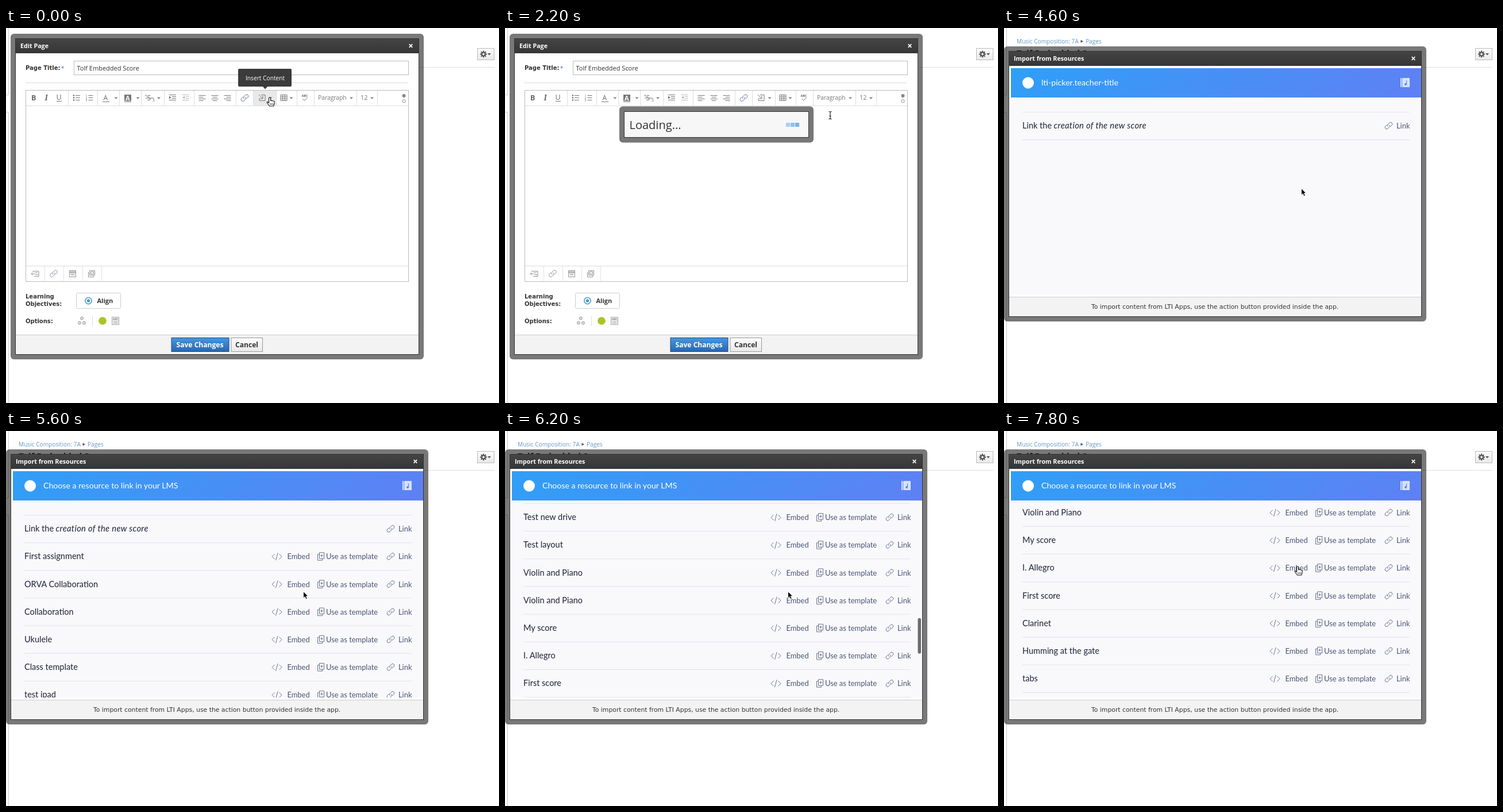
An HTML page for the animation above (8 s loop, 858x653 px).

```html
<!DOCTYPE html>
<html lang="en">
<head>
<meta charset="utf-8">
<title>Insert content</title>
<style>
html, body { margin: 0; width: 100%; height: 100%; overflow: hidden; background: #fff; }
svg { display: block; width: 100%; height: 100%; }
text { white-space: pre; font-family: "Open Sans", sans-serif; }
.lato { font-family: Lato, sans-serif; }
.wide { font-family: "DejaVu Sans", sans-serif; }
.serif { font-family: "Liberation Serif", serif; }
.b { font-weight: 700; }
.i { font-style: italic; }
.ln { fill: none; stroke: #777; stroke-width: 1; }
.dot { fill: none; stroke: #bbb; stroke-dasharray: 1 1; }
.act { fill: none; stroke: #59637f; stroke-width: .9; }
</style>
</head>
<body>
<svg id="stage" viewBox="0 0 858 653" xmlns="http://www.w3.org/2000/svg"></svg>
<script>
const LOOP = 8000, STEP = 200, PITCH = 48.2;

const text = (x, y, s, size, fill = '#333', cls = '', more = '') =>
  `<text x="${x}" y="${y}" font-size="${size}" fill="${fill}" class="${cls}" ${more}>${s}</text>`;
const rect = (x, y, w, h, fill, more = '') =>
  `<rect x="${x}" y="${y}" width="${w}" height="${h}" fill="${fill}" ${more}/>`;
const path = (d, cls = 'ln', more = '') => `<path d="${d}" class="${cls}" ${more}/>`;
const circle = (x, y, r, fill, more = '') => `<circle cx="${x}" cy="${y}" r="${r}" fill="${fill}" ${more}/>`;
const group = (id, body, more = '') => `<g id="${id}" ${more}>${body}</g>`;
const caret = (x, y = 120.5, fill = '#888') => `<path d="M${x - 3} ${y}h6l-3 3.4z" fill="${fill}"/>`;
const cross = (x, y) => path(`M${x - 2.8} ${y - 2.8}l5.6 5.6m0 -5.6l-5.6 5.6`, '', 'stroke="#fff" stroke-width="1.7"');

const defs = `<defs>
  <linearGradient id="bar" x2="0" y2="1"><stop stop-color="#444"/><stop offset="1" stop-color="#363636"/></linearGradient>
  <linearGradient id="blue" x2="0" y2="1"><stop stop-color="#4797e0"/><stop offset="1" stop-color="#2767b0"/></linearGradient>
  <linearGradient id="grey" x2="0" y2="1"><stop stop-color="#fcfcfc"/><stop offset="1" stop-color="#e9e9e9"/></linearGradient>
  <linearGradient id="banner" gradientUnits="userSpaceOnUse" x1="178" y1="-96" x2="560" y2="287">
    <stop stop-color="#2f9ff7"/><stop offset="1" stop-color="#5f80f4"/></linearGradient>
  <clipPath id="view"><rect x="12" y="121" width="714" height="343"/></clipPath>
  <g id="chain" class="act"><path d="M668.3 171.6a2.9 2.9 0 0 1 0 -3.9l2.6 -2.6a2.9 2.9 0 0 1 4.1 4.1l-2.6 2.6M670.6 168.7a2.9 2.9 0 0 1 0 3.9l-2.6 2.6a2.9 2.9 0 0 1 -4.1 -4.1l2.6 -2.6"/></g>
  <g id="linkAct"><use href="#chain"/>${text(683, 175.2, 'Link', 12.9, '#4b5573', 'lato')}</g>
  <g id="acts">
    ${path('M467.5 166l-4.5 4.5 4.5 4.5M475.5 166l4.5 4.5 -4.5 4.5M473 164l-3.5 13', 'act')}
    ${text(489.5, 175.2, 'Embed', 12.9, '#4b5573', 'lato')}
    ${path('M545.5 163.5h8v10.5h-8zM545.5 166.5h-3v10.500h8v-3M549.5 166.500v4.500M547.200 168.800h4.600', 'act')}
    ${text(557, 175.2, 'Use as template', 12.9, '#4b5573', 'lato')}
    <use href="#linkAct"/>
  </g>
</defs>`;

function page() {
  const teeth = [...Array(8).keys()].map(k =>
    `<rect x="829.9" y="39.6" width="2.2" height="3" fill="#555" transform="rotate(${k * 45} 831 45.5)"/>`).join('');
  return path('M4.5 0V116.5H0M0 146.5H4.5V653', '', 'fill="none" stroke="#ccc"')
    + path('M22 68.5H850', '', 'stroke="#ddd"')
    + text(22, 27, 'Music Composition: 7A', 10.15, '#6697c6')
    + '<path d="M133.5 20.7v5l4.5 -2.5z" fill="#555"/>'
    + text(142, 27, 'Pages', 10.15, '#6697c6')
    + text(22, 49, 'Tolf Embedded Score', 15, '#333', 'b')
    + rect(820.5, 35.5, 29, 20, 'url(#grey)', 'stroke="#bbb"')
    + teeth + circle(831, 45.5, 2.9, 'none', 'stroke="#555" stroke-width="2"')
    + caret(841, 44, '#555');
}

// Translucent frame with a dark title bar
function dialog(x, y, w, h, title, foot) {
  return rect(x - 8, y - 8, w + 17, h + 17, '#000', 'rx="6" fill-opacity=".53"')
    + rect(x + .5, y + .5, w, h, '#fff', 'stroke="#333"')
    + rect(x + 1, y + 1, w - 1, 25, 'url(#bar)')
    + text(x + 9, y + 17.4, title, 10.7, '#fff', 'b')
    + cross(x + w - 13.5, y + 13)
    + rect(x + 1, foot, w - 1, y + h - foot, '#f3f3f3')
    + path(`M${x + 1} ${foot + .5}h${w - 1}`, '', 'stroke="#ccc"');
}

// Stacked lines: [offset, length] pairs, 3 px apart
const lines = (x, y, pairs) =>
  path(pairs.map(([o, n], k) => `M${x + o} ${y + k * 3}h${n}`).join(''));

function toolbar() {
  const g = '#666', dividers = [108, 159, 197, 235, 275, 327, 400, 430, 470, 506, 536, 610, 646];
  let s = dividers.map(x => path(`M${x + .5} 109V135`, 'dot')).join('');
  s += text(44, 126, 'B', 12.5, g, 'b') + text(67.5, 126, 'I', 14, g, 'serif i b') + text(87.5, 125, 'U', 12.5, g)
    + path('M88 127.5h9');
  for (let k = 0; k < 3; k++) {
    const y = 117.5 + k * 4;
    s += circle(118, y, 1.2, g) + path(`M121 ${y}h8M143.5 ${y}h8`)
      + text(138.5, y + 2, k + 1, 5, g);
  }
  s += text(169.5, 126, 'A', 12, g) + path('M168 128.5h12', 'ln', 'stroke-width="2"') + caret(191.5)
    + rect(206, 116, 12, 11, '#777') + text(208, 125.5, 'A', 11, '#fff', 'b') + path('M206 128.5h12') + caret(229.5)
    + text(245.5, 126, 'S', 12, g) + path('M243 122h14') + text(242, 119, 'a', 6, g) + text(255, 128, '3', 6.5, g) + caret(266)
    + lines(284, 116.5, [[0, 12], [5, 7], [5, 7], [0, 12]]) + '<path d="M284 118.5v5l3.5 -2.5z" fill="#666"/>'
    + '<g opacity=".5">' + lines(306.5, 116.5, [[0, 12], [6, 6], [6, 6], [0, 12]]) + '<path d="M311 118.5v5l-4 -2.5z" fill="#666"/></g>'
    + lines(335.5, 117.5, [[0, 12], [0, 8], [0, 12], [0, 8]])
    + lines(357.5, 117.5, [[0, 12], [2, 8], [0, 12], [2, 8]])
    + lines(379.5, 117.5, [[0, 12], [4, 8], [0, 12], [4, 8]])
    + '<use href="#chain" x="-254" y="-48.5"/>'
    + path('M444 116.5h7v10h-10v-4M440 116l6.5 6.5M447 118v5h-5', 'ln', 'stroke-width="1.4"') + caret(460.5)
    + path('M478 116.5h11v10h-11zM478 119.8h11M478 123.2h11M481.7 116.5v10M485.4 116.5v10') + caret(496.5)
    + text(514.5, 119.5, 'ABC', 5.5, g, 'b') + path('M516.5 123l3 3.5 5 -5.5', 'ln', 'stroke-width="1.8"')
    + text(543, 125.3, 'Paragraph', 10.3, '#777') + caret(601)
    + text(617, 125.3, '12', 10.8, '#777') + caret(637)
    + circle(692.5, 118, 3, '#888') + circle(692.5, 127.3, 2.6, '#fff', 'stroke="#888"');
  return s;
}

function lowerIcons() {
  let s = [67, 100, 133, 166].map(x => path(`M${x + .5} 415V441`, 'dot')).join('');
  s += path('M46 423.5h11v9h-8M44 428h6M46.5 425.5l-2.5 2.5 2.5 2.5M50 426h5M51 429.5h5')
    + '<use href="#chain" x="-586.5" y="257.5"/>'
    + rect(110.5, 422.5, 11, 4, '#bbb', 'stroke="#888"') + rect(110.5, 426.5, 11, 7, '#eee', 'stroke="#888"') + path('M113 429.5h6')
    + path('M145.5 422.5h9v8h-9zM143.5 425v8.5h9v-2M147.5 424.5h5v4h-5z');
  return `<g opacity=".8">${s}</g>`;
}

function editPage() {
  return dialog(16, 18, 702, 550, 'Edit Page', 534)
    + text(34, 73, 'Page Title:', 10, '#333', 'wide b') + text(96, 74, '*', 10.5, '#3b6fc4', 'wide')
    + rect(118.5, 57.5, 582, 24, '#fff', 'stroke="#bbb"') + text(123.5, 73.5, 'Tolf Embedded Score', 11)
    + path('M34 95.5H700', 'dot')
    + rect(34.5, 108.5, 666, 333, '#fff', 'stroke="#bbb"')
    + rect(431, 109, 39, 26, '#e9e9e9', 'id="pressed"')
    + path('M35 135.5H700M35 414.5H700', 'dot')
    + toolbar() + lowerIcons()
    + text(34, 470.5, 'Learning', 10, '#333', 'wide b') + text(34, 483.5, 'Objectives:', 10, '#333', 'wide b')
    + rect(122.5, 461.5, 77, 27, '#fff', 'rx="2" stroke="#ccc"')
    + circle(143.5, 475, 5.6, '#fff', 'stroke="#5aa5d8" stroke-width="1.8"') + circle(143.5, 475, 2.7, '#4a97d0')
    + text(158.5, 479, 'Align', 11, '#333', 'b')
    + text(34, 513.5, 'Options:', 10, '#333', 'wide b')
    + [[132, 505.5], [128, 513.5], [136, 513.5]].map(([x, y]) => circle(x, y, 2.5, '#ddd', 'stroke="#999"')).join('')
    + path('M150.5 502V519', 'dot') + circle(168, 510, 6.8, '#a9c523')
    + rect(184.5, 503.5, 12, 13, '#f2f2f2', 'stroke="#aaa"') + text(185.7, 509.3, 'ABC', 5, '#888', 'b')
    + path('M186.5 511.5h8M186.5 514h8', 'ln', 'opacity=".6"')
    + rect(288, 539.5, 100, 24, 'url(#blue)', 'stroke="#1f4a7c"') + text(296.5, 556, 'Save Changes', 12.1, '#fff', 'b')
    + rect(392, 539.5, 54.5, 24, 'url(#grey)', 'stroke="#999"') + text(399, 556, 'Cancel', 12.1, '#333', 'b');
}

const tip = rect(404, 71, 93, 31, '#3b3b3b', 'rx="2"') + '<path d="M447 102h8l-4 4.5z" fill="#3b3b3b"/>'
  + text(417, 90.5, 'Insert Content', 10.2, '#fff');

const menu = rect(430.5, 135.5, 180, 167, '#fff', 'stroke="#bbb"')
  + rect(431, 136, 179, 28, '#e9e9e9', 'id="hover"')
  + ['Import from Resources', 'Image/Media', 'Symbol', 'Equation', 'LaTeX', 'Table']
    .map((s, k) => text(442, 153.7 + 28 * k, s, 10.3, '#555')).join('');

const loading = rect(199, 136.5, 338, 63, '#777', 'rx="6"')
  + rect(207.5, 145.5, 321, 45, '#f7f7f7', 'stroke="#333"')
  + text(216.5, 176, 'Loading...', 20)
  + [0, 1, 2].map(k => rect(489 + 8 * k, 165, 7, 7, '#a9cdf3', 'class="box"')).join('');

const firstRows = ['First assignment', 'ORVA Collaboration', 'Collaboration', 'Ukulele', 'Class template', 'test ipad'];
const lastRows = ['Test new drive', 'Test layout', 'Violin and Piano', 'Violin and Piano', 'My score', 'I. Allegro',
  'First score', 'Clarinet', 'Humming at the gate', 'tabs'];
const spare = ['My score', 'Collaboration', 'First score', 'Ukulele', 'Test layout', 'Clarinet'];
const titles = [...firstRows, ...Array.from({ length: 26 }, (_, k) => spare[k % spare.length]), ...lastRows];

function picker() {
  const ink = '#1f2236', rule = y => path(`M32 ${y}H706`, '', 'stroke="#e1e2ea"');
  const rows = titles.map((s, k) => {
    const dy = PITCH * (k + 1);
    return `<g transform="translate(0 ${dy.toFixed(1)})">${text(32, 175.3, s, 14.5, ink, 'lato')}<use href="#acts"/>${rule(194.5)}</g>`;
  }).join('');
  const list = rule(146.5) + text(32, 175.3, 'Link the', 14.5, ink, 'lato')
    + text(86.5, 175.3, 'creation of the new score', 14.7, ink, 'lato i', 'letter-spacing=".35"')
    + '<use href="#linkAct"/>' + rule(194.5) + group('rows', rows);
  return rect(12, 70, 714, 394, '#f9f9fc')
    + `<g clip-path="url(#view)">${group('list', list)}</g>`
    + rect(12, 70, 714, 51, 'url(#banner)')
    + circle(42, 95.5, 10, '#fff')
    + text(65, 100, '', 14.15, '#fff', 'lato', 'id="heading"')
    + rect(690, 87, 2, 16, '#d5e2ff') + rect(693, 87, 13, 16, '#d5e2ff', 'rx="1"')
    + '<path d="M700.5 91.5v6.5" stroke="#5b84f4" stroke-width="1.3"/>' + circle(699, 98, 1.9, '#5b84f4')
    + rect(718.5, 72, 5.5, 62, '#6c6c70', 'id="thumb" rx="2.75"');
}

const importer = dialog(8, 40, 718, 462, 'Import from Resources', 468)
  + text(152, 489, 'To import content from LTI Apps, use the action button provided inside the app.', 10.83, '#333', 'wide')
  + group('picker', picker());

const cursors =
  group('hand', path('M-1.5 9.5V1.2a1.5 1.5 0 0 1 3 0V5.5q1.3 -1 2.5 .3q1.4 -.8 2.3 .5q1.6 -.5 1.7 1.2v3.2l-1.5 4.3h-7l-4 -5.5q-1 -2 .8 -2z', '',
    'fill="#fff" stroke="#111" stroke-width="1.1" stroke-linejoin="round"') + path('M.8 10v3M3 10v3M5.2 10v3', '', 'stroke="#111" stroke-width=".8"'))
  + group('arrow', path('M0 0V11.5L2.7 9 4.5 13.2 6.7 12.2 4.9 8.2H8.3Z', '', 'fill="#000" stroke="#fff" stroke-width=".9"'))
  + group('beam', path('M-2.5 -6.5q2.5 0 2.5 1.5q0 -1.5 2.5 -1.5M0 -5V5M-2.5 6.5q2.5 0 2.5 -1.5q0 1.5 2.5 1.5M-1.5 1.5h3', '',
    'fill="none" stroke="#111" stroke-width="1.1"'));

const stage = document.getElementById('stage');
stage.innerHTML = defs + page() + group('edit', editPage()) + group('tip', tip) + group('menu', menu)
  + group('loading', loading) + group('importer', importer) + cursors;

const el = id => document.getElementById(id);
const show = (id, on) => el(id).setAttribute('visibility', on ? 'inherit' : 'hidden');
const boxes = stage.querySelectorAll('.box');

// Each track is a list of [time, values...]
const pointer = [[0, 459, 121], [800, 459, 121], [1600, 566, 152], [3199, 566, 152], [3200, 517.5, 279.5],
  [5600, 517.5, 279.5], [6200, 492.5, 279.5], [6800, 492.5, 279.5], [7600, 511, 236]];
const scroll = [[5600, 0], [5800, 480], [6000, 1150], [6200, 1610.6], [6400, 1712], [6600, 1750], [6800, 1763.4]];
const fade = [[5600, 0], [5800, 1], [6800, 1], [7200, 0]];

function at(track, t) {
  const n = track.findIndex(k => k[0] > t);
  if (n < 0) return track[track.length - 1].slice(1);
  if (n === 0) return track[0].slice(1);
  const a = track[n - 1], b = track[n], p = (t - a[0]) / (b[0] - a[0]);
  return a.slice(1).map((v, k) => v + (b[k + 1] - v) * p);
}

function draw(t) {
  const within = (a, b) => t >= a && t < b;
  show('edit', t < 2400);
  show('pressed', t < 1800);
  show('tip', t < 800);
  show('menu', within(400, 1800));
  show('hover', within(1200, 1800));
  show('loading', within(2000, 2400));
  show('importer', t >= 2400);
  show('picker', t >= 4600);
  show('rows', t >= 5200);
  el('heading').textContent = t < 4800 ? 'lti-picker.teacher-title' : 'Choose a resource to link in your LMS';

  const blues = ['#a9cdf3', '#93bff1', '#7eb1ec'];
  boxes.forEach((box, k) => box.setAttribute('fill', blues[(k + (t < 2200 ? 1 : 0)) % 3]));

  const [y] = at(scroll, t);
  el('list').setAttribute('transform', `translate(0 ${-y})`);
  el('thumb').setAttribute('y', 72 + y * .1576);
  el('thumb').setAttribute('opacity', at(fade, t)[0]);

  const kind = t < 1800 || t >= 7600 ? 'hand' : t < 3200 ? 'beam' : 'arrow';
  const [px, py] = at(pointer, t);
  for (const id of ['hand', 'arrow', 'beam']) show(id, id === kind);
  el(kind).setAttribute('transform', `translate(${px} ${py})`);
}

const start = performance.now();
function tick() {
  const t = (performance.now() - start) % LOOP;
  draw(Math.floor(t / STEP) * STEP);
  requestAnimationFrame(tick);
}
tick();
</script>
</body>
</html>
```
